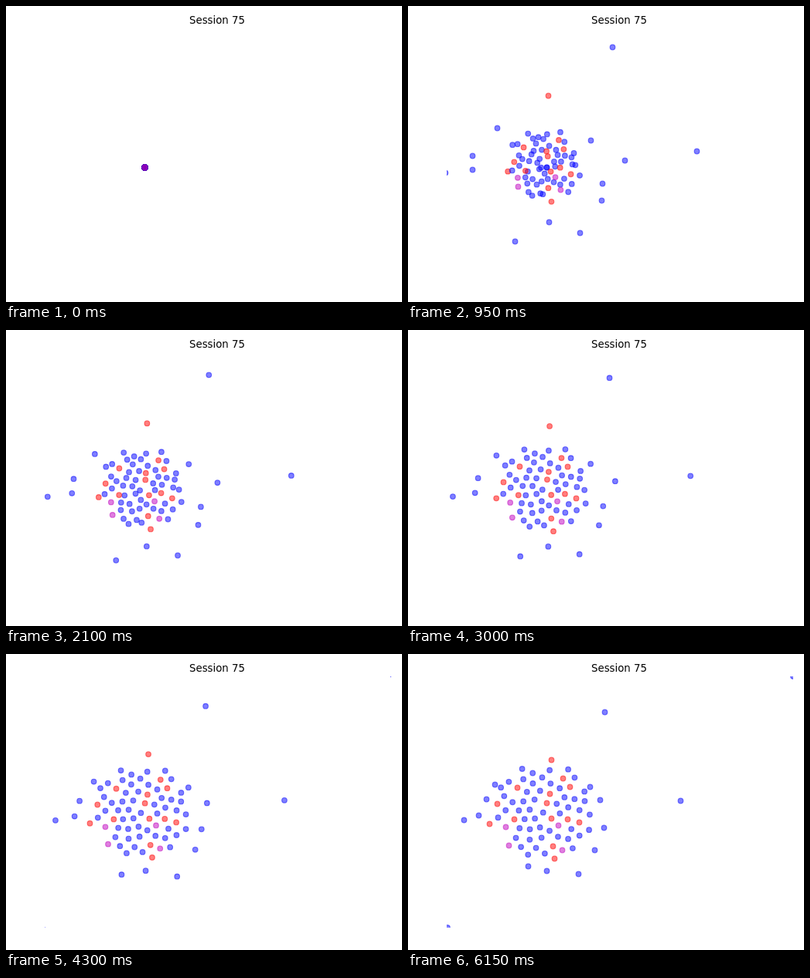
Animation, 512 px wide and 384 px high, one loop 6.2 s. Source, as an HTML page:

```html
<!DOCTYPE html>
<html lang="en">
<head>
<meta charset="utf-8">
<title>Session 75</title>
<style>
  html, body { margin: 0; width: 100%; height: 100%; overflow: hidden; background: #fff; }
  svg { display: block; width: 512px; height: 384px; }
  text { font: 13.333px "DejaVu Sans", sans-serif; text-anchor: middle; }
  circle { stroke-width: 1.11px; fill-opacity: .5; stroke-opacity: .5; }
</style>
</head>
<body>
<svg viewBox="0 0 512 384">
  <clipPath id="plot"><rect x="50" y="29" width="448" height="326"/></clipPath>
  <text x="273" y="22.5">Session 75</text>
  <g clip-path="url(#plot)"><g id="dots" transform="translate(.5 .5)"></g></g>
</svg>
<script>
const LOOP = 6200, STEP = 50, BURST = 950, END = 6150;
const HOME = { x: 179, y: 209 };
const CLUSTER = { x: 174, y: 205, rx: 67, ry: 60, size: 51, gap: 13.5, squeeze: 0.72 };
const BLUE = "#00f", RED = "#f00", MAGENTA = "#bf00bf";

const point = ([x, y]) => ({ x, y });
const mix = (a, b, k) => a + (b - a) * k;
const easeOut = (u, power) => 1 - (1 - u) ** power;

let seed = 75;
function random() {
  seed = (seed * 16807) % 2147483647;
  return seed / 2147483647;
}

// Resting places of the coloured dots inside the cluster.
const reds = [
  [200, 161], [209, 172], [141, 173], [183, 181], [179, 193], [185, 213], [105, 220],
  [115, 194], [221, 218], [137, 214], [206, 214], [187, 249], [189, 265]
].map(point);
const magentas = [[126, 224], [194, 222], [130, 248], [199, 254]].map(point);

// Stragglers around the cluster drift from one point to another.
const drift = ([x0, y0, x1, y1]) => ({ start: point([x0, y0]), end: point([x1, y1]), power: 1 });
const stragglers = [
  [264, 53, 254, 75], [115, 158, 112, 169], [236, 174, 235, 172], [83, 194, 101, 188],
  [280, 200, 248, 189], [373, 188, 352, 190], [48, 216, 72, 215], [83, 212, 91, 209],
  [251, 230, 253, 225], [250, 252, 241, 254], [182, 280, 179, 281], [222, 294, 220, 285],
  [138, 305, 155, 275]
].map(drift);
const redStraggler = drift([181, 116, 185, 137]);

// Two dots leave the cluster late and come to rest near opposite corners.
const runaways = [[503.5, 23, 497.5, 28.5], [43.5, 362.5, 50.5, 354.5]]
  .map(row => ({ ...drift(row), leave: BURST, arrive: 1450 }));

// A sunflower spiral gives an even disc; coloured dots take over their nearest slots.
function fillCluster(fixed) {
  const total = CLUSTER.size + fixed.length;
  const free = Array.from({ length: total }, (_, i) => {
    const r = Math.sqrt((i + 0.5) / total), angle = i * Math.PI * (3 - Math.sqrt(5));
    return { x: CLUSTER.x + CLUSTER.rx * r * Math.cos(angle), y: CLUSTER.y + CLUSTER.ry * r * Math.sin(angle) };
  });
  for (const f of fixed) {
    const distances = free.map(p => Math.hypot(p.x - f.x, p.y - f.y));
    free.splice(distances.indexOf(Math.min(...distances)), 1);
  }
  for (let round = 0; round < 30; round++) relax(free, fixed);
  return free;
}

function relax(free, fixed) {
  for (const p of free) {
    for (const q of [...free, ...fixed]) {
      const dx = p.x - q.x, dy = p.y - q.y, distance = Math.hypot(dx, dy);
      if (p === q || distance >= CLUSTER.gap) continue;
      const push = 0.3 * (CLUSTER.gap - distance) / distance;
      p.x += dx * push;
      p.y += dy * push;
    }
  }
}

// Cluster dots begin closer together and a little uneven.
function loosen(end) {
  const squeeze = axis => mix(HOME[axis], end[axis], CLUSTER.squeeze) + (random() - 0.5) * 8;
  return { start: { x: squeeze("x"), y: squeeze("y") }, end, power: 2 };
}

const edge = [...stragglers, redStraggler].map(dot => dot.end);
const core = fillCluster([...reds, ...magentas]);
relax(core, edge);

const layer = document.getElementById("dots");
function makeDot({ dot, color }) {
  const node = document.createElementNS("http://www.w3.org/2000/svg", "circle");
  node.setAttribute("r", 3.333);
  node.setAttribute("fill", color);
  node.setAttribute("stroke", color);
  layer.append(node);
  return { leave: STEP, arrive: BURST, ...dot, node };
}

// Interleave the groups so that the stacked dots blend evenly.
const groups = [
  [[redStraggler], RED], [core.map(loosen), BLUE], [reds.map(loosen), RED],
  [[...runaways, ...stragglers], BLUE], [magentas.map(loosen), MAGENTA]
];
const dots = groups
  .flatMap(([list, color]) => list.map((dot, i) => ({ dot, color, depth: (i + 1) / list.length })))
  .sort((a, b) => a.depth - b.depth)
  .map(makeDot);

function position({ start, end, power, leave, arrive }, t) {
  if (t <= leave) return HOME;
  if (t < arrive) {
    const u = (t - leave) / (arrive - leave);
    return { x: mix(HOME.x, start.x, easeOut(u, 1.5)), y: mix(HOME.y, start.y, u ** 1.5) };
  }
  const k = easeOut((t - BURST) / (END - BURST), power);
  return { x: mix(start.x, end.x, k), y: mix(start.y, end.y, k) };
}

function draw(time) {
  const t = Math.floor((time % LOOP) / STEP) * STEP;
  for (const dot of dots) {
    const { x, y } = position(dot, t);
    dot.node.setAttribute("cx", x.toFixed(2));
    dot.node.setAttribute("cy", y.toFixed(2));
  }
}

let start;
function tick(now) {
  start ??= now;
  draw(now - start);
  requestAnimationFrame(tick);
}
draw(0);
requestAnimationFrame(tick);
</script>
</body>
</html>
```
